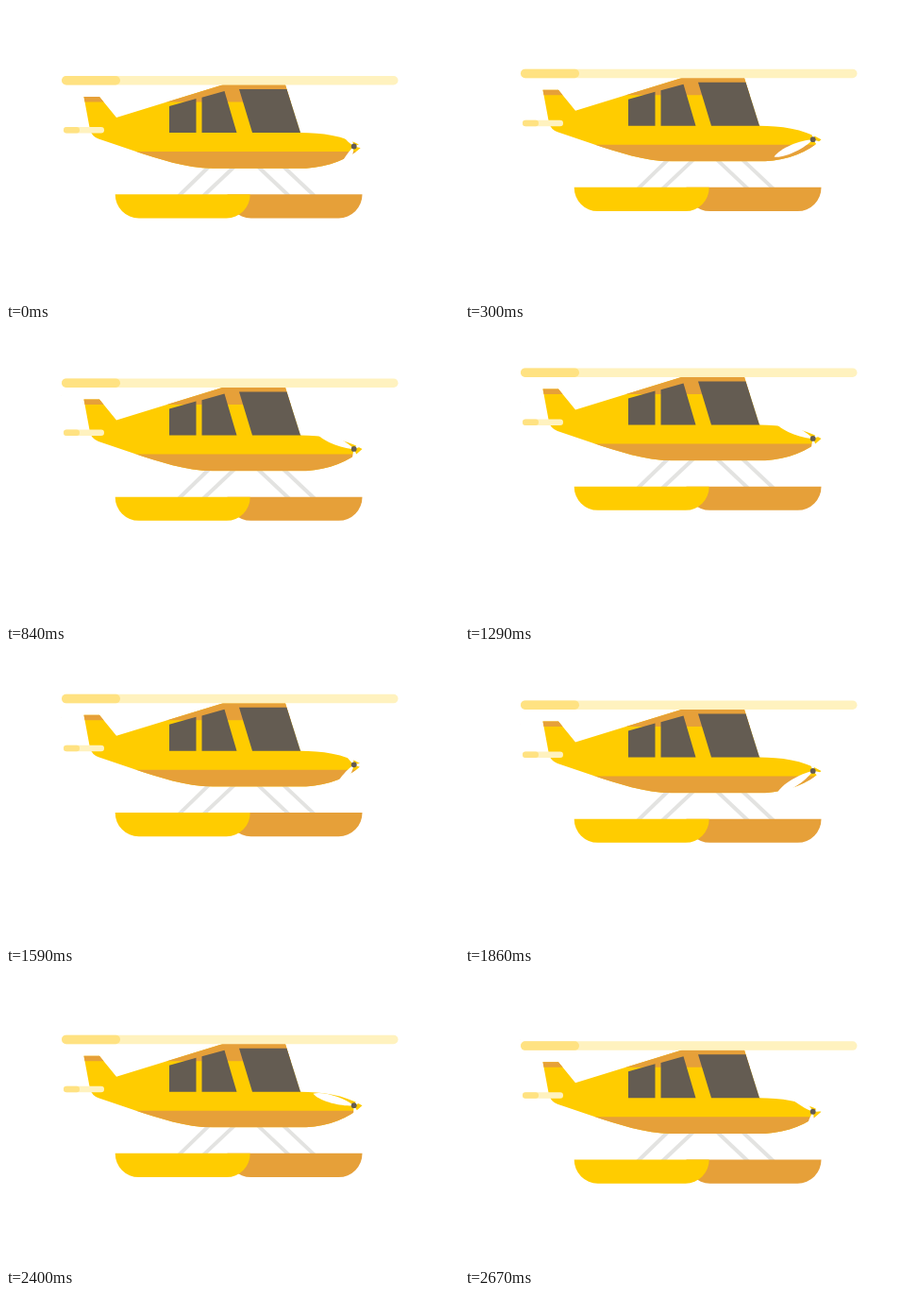
Write an HTML page that moves like this. It is 480 px wide and 311 px high and loops after 2.7 s.

```html
<!DOCTYPE html>
<html lang="en">
<head>
<meta charset="utf-8">
<title>Seaplane</title>
<style>
  html, body { margin: 0; width: 100%; height: 100%; overflow: hidden; background: #fff; }
  svg { display: block; width: 100vw; height: 100vh; }
  .yellow { fill: #fc0; }
  .orange { fill: #e6a039; }
  .dark { fill: #645c52; }
  .pale { fill: #fff2bf; }
  .cream { fill: #ffe282; }
  .struts { stroke: #e3e3e1; stroke-width: 4; fill: none; }
</style>
</head>
<body>
<svg viewBox="0 0 480 311">
  <defs>
    <path id="body" d="M82.5 96H99L117 118L230 83.3H296L312 134C334 134 358 137 377.500 148.500C364 162 342 170 318 171.700H219C190 171.500 163 162 135 153L98 140.500Q91 138 89 131Z"/>
    <path id="float" d="M115.700 199.200H258.700A25 25 0 0 1 233.700 224.400H140.700A25 25 0 0 1 115.700 199.200Z"/>
    <path id="blade" d="M0 0C-12 -5 -36 -6 -45 0C-36 6 -12 5 0 0Z"/>
    <clipPath id="hull"><use href="#body"/></clipPath>
  </defs>
  <g id="plane">
    <path class="struts" d="M216 169L183 201M243 169L209 201M266 169L300 201M293 169L327 201"/>
    <use href="#float" x="118.800" class="orange"/>
    <use href="#float" class="yellow"/>
    <g clip-path="url(#hull)">
      <rect class="yellow" x="80" y="80" width="300" height="95"/>
      <path class="orange" d="M80 80H380V101.500H80ZM80 154H380V175H80Z"/>
      <path class="dark" d="M173 106L201.500 98V134H173ZM207.500 96.700L231.500 90L244.500 134H207.500ZM247 88H298L313 134H261Z"/>
    </g>
    <rect class="pale" x="59" y="74" width="356.500" height="9.500" rx="4.750"/>
    <rect class="cream" x="59" y="74" width="62" height="9.500" rx="4.750"/>
    <rect class="pale" x="61" y="128" width="43" height="6.500" rx="3.250"/>
    <rect class="cream" x="61" y="128" width="17" height="6.500" rx="3.250"/>
    <g transform="translate(368.700 148.500)">
      <g id="propeller" fill="#fff">
        <use href="#blade"/>
        <use href="#blade" transform="rotate(120)"/>
        <use href="#blade" transform="rotate(240)"/>
      </g>
      <circle class="dark" r="2.900"/>
    </g>
  </g>
</svg>
<script>
  const LOOP = 2700, STEP = 30, LIFT = 33, TURNS = 4;
  const plane = document.getElementById('plane');
  const propeller = document.getElementById('propeller');

  function draw(now) {
    const phase = Math.floor(now % LOOP / STEP) * STEP / LOOP;
    const rise = LIFT * (1 - Math.abs(1 - 2 * phase));
    plane.setAttribute('transform', `translate(0 ${-rise})`);
    propeller.setAttribute('transform', `rotate(${56 + 360 * TURNS * phase})`);
    requestAnimationFrame(draw);
  }
  draw(0);
</script>
</body>
</html>
```
